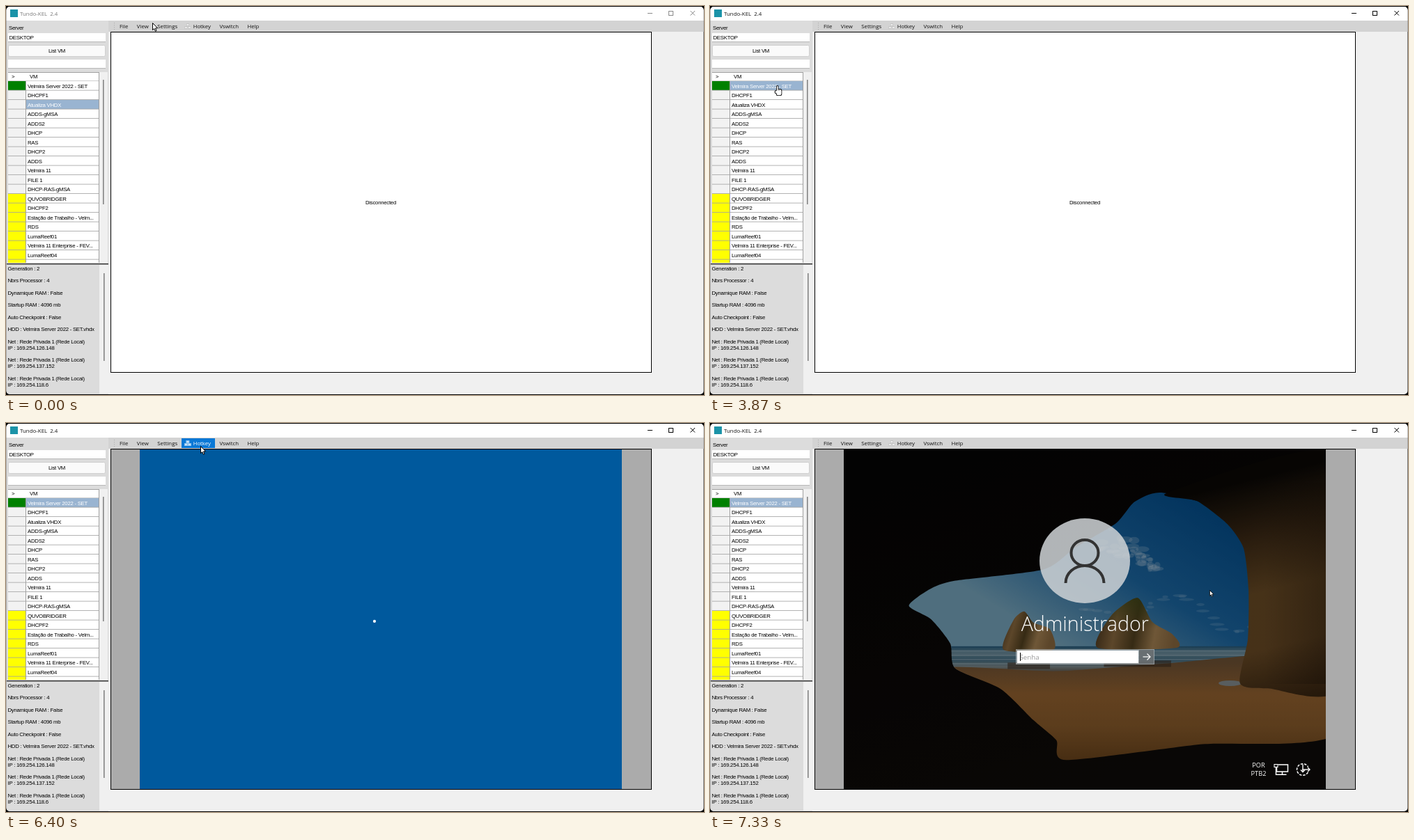
An HTML page with a canvas that plays this animation: 1002x559 px, repeating every 8000 ms.

```html
<!DOCTYPE html>
<html lang="en">
<head>
<meta charset="utf-8">
<title>VM console</title>
<style>
html, body { margin: 0; width: 100%; height: 100%; overflow: hidden; background: #000; }
canvas { display: block; }
</style>
</head>
<body>
<canvas id="stage" width="1002" height="559"></canvas>
<script>
const ctx = document.getElementById('stage').getContext('2d');
const LOOP = 8000;
const SANS = '"Liberation Sans", Arial, sans-serif';
const UI = '"Open Sans", "Noto Sans", sans-serif';

const VMS = ['Velmira Server 2022 - SET', 'DHCPF1', 'Atualiza VHDX', 'ADDS-gMSA', 'ADDS2', 'DHCP',
  'RAS', 'DHCP2', 'ADDS', 'Velmira 11', 'FILE 1', 'DHCP-RAS-gMSA', 'QUVOBRIDGER', 'DHCPF2',
  'Estação de Trabalho - Velm...', 'RDS', 'LumaReef01', 'Velmira 11 Enterprise - FEV...', 'LumaReef04', ''];
const DETAILS = ['Generation : 2', 'Nbrs Processor : 4', 'Dynamique RAM : False', 'Startup RAM : 4096 mb',
  'Auto Checkpoint : False', 'HDD : Velmira Server 2022 - SET.vhdx'];
const NETS = ['169.254.126.148', '169.254.137.152', '169.254.118.6'];
const MENU = ['File', 'View', 'Settings', 'Hotkey', 'Vswitch', 'Help'];

// pointer strokes: begin, end, target and the control point that bends the path
const START = [210, 24];
const MOVES = [
  { begin: 0, end: 530, to: [99, 109.5], via: [110, 190] },
  { begin: 800, end: 1130, to: [96.5, 114], via: [98, 110] },
  { begin: 4930, end: 5000, to: [240, 112], via: [168, 113] },
  { begin: 5000, end: 5670, to: [279, 33], via: [460, 40] },
  { begin: 6400, end: 6870, to: [717, 240], via: [480, 130] }
];

const clamp = v => Math.max(0, Math.min(1, v));
const ease = u => u * u * (3 - 2 * u);

function pointerAt(t) {
  let from = START;
  for (const { begin, end, to, via } of MOVES) {
    if (t < begin) break;
    const u = ease(clamp((t - begin) / (end - begin))), v = 1 - u;
    from = from.map((p, i) => v * v * p + 2 * u * v * via[i] + u * u * to[i]);
  }
  return from;
}

function seeded(seed) {
  return () => (seed = seed * 16807 % 2147483647) / 2147483647;
}

function rect(x, y, w, h, fill, stroke) {
  if (fill) { ctx.fillStyle = fill; ctx.fillRect(x, y, w, h); }
  if (stroke) {
    ctx.strokeStyle = stroke; ctx.lineWidth = 1;
    ctx.strokeRect(x + .5, y + .5, w - 1, h - 1);
  }
}

function text(s, x, y, font, color, align = 'left', spacing = 0) {
  ctx.font = font;
  ctx.letterSpacing = spacing + 'px';
  ctx.textAlign = align;
  ctx.fillStyle = color;
  ctx.fillText(s, x, y);
  ctx.letterSpacing = '0px';
}

const label = (s, x, y, color = '#000', align) => text(s, x, y, '7.8px ' + SANS, color, align, -.27);
const ui = (s, x, y, size, color, weight = 400, align) => text(s, x, y, `${weight} ${size}px ${UI}`, color, align);

function line(points, color, width = 1) {
  ctx.beginPath();
  points.forEach(p => ctx.lineTo(...p));
  ctx.strokeStyle = color; ctx.lineWidth = width;
  ctx.stroke();
}

function ellipse(x, y, rx, ry, fill, from = 0, to = Math.PI * 2) {
  ctx.beginPath();
  ctx.ellipse(x, y, rx, ry, 0, from, to);
  if (fill) { ctx.fillStyle = fill; ctx.fill(); }
}

// closed curve through the given points
function blob(points, fill) {
  const at = i => points[(i + points.length) % points.length];
  const near = (p, a, b) => [p[0] + (b[0] - a[0]) / 9, p[1] + (b[1] - a[1]) / 9];
  ctx.beginPath();
  ctx.moveTo(...points[0]);
  points.forEach((p, i) => {
    const q = at(i + 1);
    ctx.bezierCurveTo(...near(p, at(i - 1), q), ...near(q, at(i + 2), p), ...q);
  });
  if (fill) { ctx.fillStyle = fill; ctx.fill(); }
}

function grad(x0, y0, x1, y1, ...colors) {
  const g = ctx.createLinearGradient(x0, y0, x1, y1);
  colors.forEach((c, i) => g.addColorStop(i / (colors.length - 1), c));
  return g;
}

function clipped(x, y, w, h, draw) {
  ctx.save();
  ctx.beginPath(); ctx.rect(x, y, w, h); ctx.clip();
  draw();
  ctx.restore();
}

function drawFrame(active) {
  const ink = active ? '#000' : '#8a8a8a';
  rect(0, 0, 1002, 559, '#000');
  ctx.save();
  ctx.beginPath(); ctx.roundRect(.5, 1, 1001, 557, 5); ctx.clip();
  rect(0, 0, 1002, 559, '#f0f0f0');
  rect(0, 0, 1002, 21, '#fff');
  rect(147, 21, 855, 16, '#d3d3d3');
  rect(0, 21, 147, 538, '#dcdcdc');
  ctx.restore();
  rect(6, 5, 11, 11, '#1b93a8');
  ui('Tundo-KEL  2.4', 20, 13.5, 7.9, active ? '#111' : '#777');
  line([[921, 10.5], [928, 10.5]], ink);
  rect(951, 7, 7, 7, null, ink);
  line([[982.5, 7], [989, 13.5]], ink);
  line([[989, 7], [982.5, 13.5]], ink);
}

function drawMenu(px, py) {
  const gap = 12.5, icon = 10;
  for (let y = 24; y < 35; y += 3) rect(155, y, 1, 1, '#aaa');
  let x = 163;
  for (const name of MENU) {
    const keys = name === 'Hotkey';
    ctx.font = '7.8px ' + UI;
    const left = x - gap / 2, w = ctx.measureText(name).width + (keys ? icon : 0);
    const hover = py > 21 && py < 37 && px > 230 && px > left && px < left + w + gap;
    if (hover) rect(Math.round(left), 22, Math.round(w + gap), 14, '#0a78d6');
    if (keys) {
      for (let i = 0; i < 3; i++)
        rect(x - 2.5 + (i ? i * 5 - 5 : 2.5), i ? 29 : 25, 4.5, 4, hover ? '#cfe6fa' : '#eee', hover ? '#8fc3ef' : '#c4c4c4');
    }
    ui(name, x + (keys ? icon : 0), 31.8, 7.8, hover ? '#fff' : '#111');
    x += w + gap;
  }
}

function field(y) {
  rect(3, y, 140, 13, '#fff');
  rect(3, y + 12, 140, 1, '#b8b8b8');
}

function drawSidebar(selected, filled) {
  label('Server', 4, 34.3);
  field(39);
  label('DESKTOP', 4.5, 48);
  ctx.beginPath(); ctx.roundRect(3.5, 56.5, 139, 16, 2);
  ctx.fillStyle = '#fafafa'; ctx.fill();
  ctx.strokeStyle = '#d0d0d0'; ctx.lineWidth = 1; ctx.stroke();
  label('List VM', 73, 67, '#000', 'center');
  field(77);

  rect(134, 95, 12, 274, '#f0f0f0');
  clipped(3, 95, 131, 274, () => {
    rect(3, 95, 131, 274, '#a0a0a0');
    rect(3, 96, 130, 11.5, '#fff');
    label('>', 8, 104);
    label('VM', 34, 104);
    VMS.forEach((name, i) => {
      const y = 108 + i * 13.5, on = i === selected;
      rect(3, y, 25, 12.7, i === 0 ? '#008000' : i > 11 ? '#ff0' : '#f2f2f2');
      rect(29, y, 104, 12.7, on ? '#99b4d1' : '#fff');
      label(name, 31, y + 9.5, on ? '#fff' : '#000');
    });
  });
  rect(139, 106, 1.6, 179, '#858585');
  rect(1, 370, 146, 1.4, '#333');

  if (!filled) return;
  rect(134, 372, 13, 185, '#f0f0f0');
  rect(140, 384, 1.6, 126, '#858585');
  clipped(1, 372, 133, 186, () => {
    DETAILS.forEach((s, i) => label(s, 2.5, 379.8 + i * 17.5));
    NETS.forEach((ip, i) => {
      label('Net : Rede Privada 1 (Rede Local)', 2.5, 485 + i * 26.4);
      label('IP : ' + ip, 2.5, 493.7 + i * 26.4);
    });
  });
}

function drawClouds() {
  const rnd = seeded(41);
  for (let i = 0; i < 46; i++) {
    const u = rnd(), spread = 34 * (1 - u) + 8;
    ellipse(560 + 78 * u + (rnd() - .5) * spread, 163 + 46 * u + (rnd() - .5) * spread,
      3 + 7 * rnd(), 2 + 3 * rnd(), 'rgba(210,222,230,.22)');
  }
  for (let i = 0; i < 24; i++) {
    const u = i / 24;
    ellipse(530 + 240 * u + 12 * rnd(), 268 + 36 * Math.sin(u * 9) * u, 8 * rnd() + 3, 2, 'rgba(190,212,225,.18)');
  }
}

function drawStack(points, x0, x1, base) {
  blob(points, grad(x0, base - 50, x1, base - 30, '#4c381f', '#8c6b40', '#52401f', '#a88454', '#8c6a40'));
  const w = x1 - x0;
  rect(x0 + w * .08, base + 18, w * .85, 9, 'rgba(62,45,30,.6)');
}

// simplified seaside cave
function drawScene(zoom, dark) {
  ctx.save();
  ctx.translate(538, 282); ctx.scale(zoom, zoom); ctx.translate(-538, -282);
  rect(180, 30, 720, 510, grad(380, 60, 520, 520, '#050404', '#0a0706', '#0e0b09'));

  ctx.save();
  blob([[291, 263], [320, 240], [355, 228], [480, 212], [525, 181], [582, 147], [608, 117], [646, 104], [740, 130],
    [900, 200], [900, 438], [700, 458], [512, 480], [498, 452], [466, 424], [420, 380], [356, 351], [349, 316], [322, 282]]);
  ctx.clip();
  rect(280, 90, 620, 232, grad(660, 100, 520, 330, '#05508f', '#1c68a4', '#78a7bf'));
  drawClouds();
  rect(280, 320, 620, 40, grad(0, 320, 0, 358, '#255a7b', '#6f909f', '#426c82', '#7d8b8e', '#5b4c3d'));
  for (let i = 0; i < 4; i++) rect(280, 326 + i * 6, 620, 1.2, 'rgba(205,218,222,.45)');
  blob([[280, 359], [500, 355], [640, 345], [900, 338], [900, 540], [280, 540]],
    grad(0, 342, 0, 478, '#705335', '#966330', '#8a5c2b', '#6d461d'));
  drawStack([[424, 325], [438, 283], [453, 271], [466, 287], [489, 296], [494, 325]], 424, 494, 325);
  const peak = [[556, 322], [576, 276], [612, 252], [633, 286], [661, 303], [667, 322]];
  drawStack(peak, 556, 667, 322);
  blob(peak, grad(0, 252, 0, 295, 'rgba(60,72,22,.75)', 'rgba(60,72,22,0)'));
  ellipse(742, 372, 16, 4, '#858d90');
  ctx.restore();

  blob([[655, 104], [696, 116], [738, 148], [761, 182], [768, 240], [767, 310], [756, 372], [795, 379], [900, 373], [900, 50]],
    grad(735, 95, 810, 400, '#0b0805', '#3d2a15', '#6a4b25', '#6a4a25', '#3a2611'));
  rect(750, 90, 150, 283, grad(790, 0, 890, 0, 'rgba(25,16,8,0)', 'rgba(25,16,8,.4)'));
  ctx.restore();
  if (dark) rect(192, 38, 692, 489, `rgba(0,0,0,${dark})`);
}

function netIcon(x, y, s) {
  ctx.save();
  ctx.translate(x, y); ctx.scale(s, s);
  ctx.strokeStyle = '#fff'; ctx.lineWidth = 1.5;
  ctx.strokeRect(4, 1, 16, 10);
  line([[12, 11], [12, 15]], '#fff', 1.5);
  line([[3, 5], [3, 15.3], [18, 15.3]], '#fff', 1.4);
  rect(0, 0, 6, 5, '#222', '#fff');
  ctx.restore();
}

function easeIcon(x, y) {
  ctx.save();
  ctx.translate(x, y);
  ctx.strokeStyle = '#fff'; ctx.lineWidth = 1.5;
  ctx.setLineDash([3.5, 1.8]);
  ellipse(0, 0, 8.5, 8.3, null, .5, Math.PI * 1.85); ctx.stroke();
  ctx.setLineDash([]);
  for (const turn of [0, Math.PI / 2]) {
    ctx.save();
    ctx.rotate(turn);
    const tip = turn ? 3.5 : 10;
    line([[tip - 11, 0], [tip, 0]], '#fff', 1.4);
    line([[tip - 3, -3], [tip, 0], [tip - 3, 3]], '#fff', 1.4);
    ctx.restore();
  }
  ctx.restore();
}

function drawLock(withText) {
  drawScene(1, 0);
  if (!withText) return;
  ui('Pressione Ctrl+Alt+Delete para desbloquear.', 208, 341, 9.7, '#fff');
  ui('06:29', 207, 422.5, 59.6, '#fff', 300);
  ui('sexta-feira, 29 de abril', 208, 468, 29, '#fff', 300);
  netIcon(857, 509.5, .54);
}

function drawLogin(a) {
  drawScene(1.022, .14 + .2 * a);
  ctx.save();
  ctx.globalAlpha = Math.pow(a, .8);
  ellipse(538, 198, 65, 61, 'rgba(205,210,214,.86)');
  ctx.strokeStyle = '#333'; ctx.lineWidth = 4;
  ellipse(538, 186.5, 19.5, 18.5); ctx.stroke();
  ellipse(538, 230, 27.5, 25, null, Math.PI, Math.PI * 2); ctx.stroke();
  ui('Administrador', 538.3, 299, 28.7, '#fff', 300, 'center');
  rect(439, 325, 199, 22, 'rgba(190,195,198,.65)');
  rect(441, 327, 174, 18, '#fff');
  rect(616, 326, 21, 20, 'rgba(90,95,98,.75)');
  line([[621.5, 336], [632, 336]], '#fff', 1.2);
  line([[627.5, 331.5], [632, 336], [627.5, 340.5]], '#fff', 1.2);
  ui('Senha', 444.5, 339.7, 9.7, '#999');
  rect(445, 330, 1, 12, '#000');
  ui('POR', 787.5, 495.3, 9.2, '#fff', 400, 'center');
  ui('PTB2', 787.5, 507.3, 9.2, '#fff', 400, 'center');
  netIcon(809.5, 490, 1);
  easeIcon(851, 498);
  ctx.restore();
}

function drawWelcome(age) {
  rect(192, 38, 692, 489, '#00599d');
  for (let i = 0; i < 4 && i * 110 <= age; i++) {
    const a = Math.PI * .9 + (age - i * 110) * .006;
    ellipse(538 + 9.5 * Math.cos(a), 282 + 9.5 * Math.sin(a), 2.1, 2.1, '#fff');
  }
}

function drawViewer(t) {
  if (t < 4130) {
    rect(150, 37, 777, 490, '#fff');
    label('Disconnected', 538, 285.3, '#000', 'center');
  } else {
    rect(150, 37, 777, 490, '#ababab');
    clipped(192, 38, 692, 489, () => {
      if (t >= 6800) drawLogin(clamp((t - 6800) / 530));
      else if (t >= 6400) drawWelcome(t - 6400);
      else if (t >= 4270) drawLock(t >= 4330);
      else if (t >= 4200) rect(192, 38, 692, 489, '#000');
    });
  }
  rect(150, 37, 777, 490, null, '#000');
}

function drawArrow(x, y, s) {
  ctx.save();
  ctx.translate(x, y); ctx.scale(s, s);
  ctx.beginPath();
  [[.5, .5], [.5, 10.5], [2.8, 8.5], [4.4, 12.2], [6, 11.5], [4.5, 7.9], [7.6, 7.7]].forEach(p => ctx.lineTo(...p));
  ctx.closePath();
  ctx.fillStyle = '#fff'; ctx.fill();
  ctx.strokeStyle = '#000'; ctx.lineWidth = 1; ctx.stroke();
  ctx.restore();
}

function drawHand(x, y) {
  ctx.save();
  ctx.translate(x - 4, y);
  // the outline is a wider black copy underneath
  for (const [color, grow] of [['#000', .8], ['#fff', 0]]) {
    ctx.fillStyle = color;
    ctx.beginPath();
    ctx.roundRect(3.4 - grow, 1 - grow, 1.7 + grow * 2, 9 + grow * 2, 1);
    ctx.roundRect(3 - grow, 5.8 - grow, 7 + grow * 2, 8.4 + grow * 2, 2.5);
    ctx.roundRect(1 - grow, 8 - grow, 4 + grow * 2, 3 + grow * 2, 1.5);
    ctx.fill();
  }
  for (const fx of [5.4, 7.3]) line([[fx, 5.4], [fx, 7.6]], '#000', .6);
  ctx.restore();
}

function render(ms) {
  // fifteen picture changes per second
  const t = Math.round(Math.floor((ms + 4) * 15 / 1000) * 20 / 3) * 10;
  const [x, y] = pointerAt(t);
  const active = t >= 2330;
  drawFrame(active);
  drawMenu(x, y);
  drawSidebar(active ? 0 : 2, t < 2530 || t >= 3870);
  drawViewer(t);
  if (x < 134 && y > 95) drawHand(x, y);
  else drawArrow(x, y, x > 192 && y > 38 ? .8 : 1);
}

function tick(now) {
  render(now % LOOP);
  requestAnimationFrame(tick);
}
render(0);
requestAnimationFrame(tick);
</script>
</body>
</html>
```
